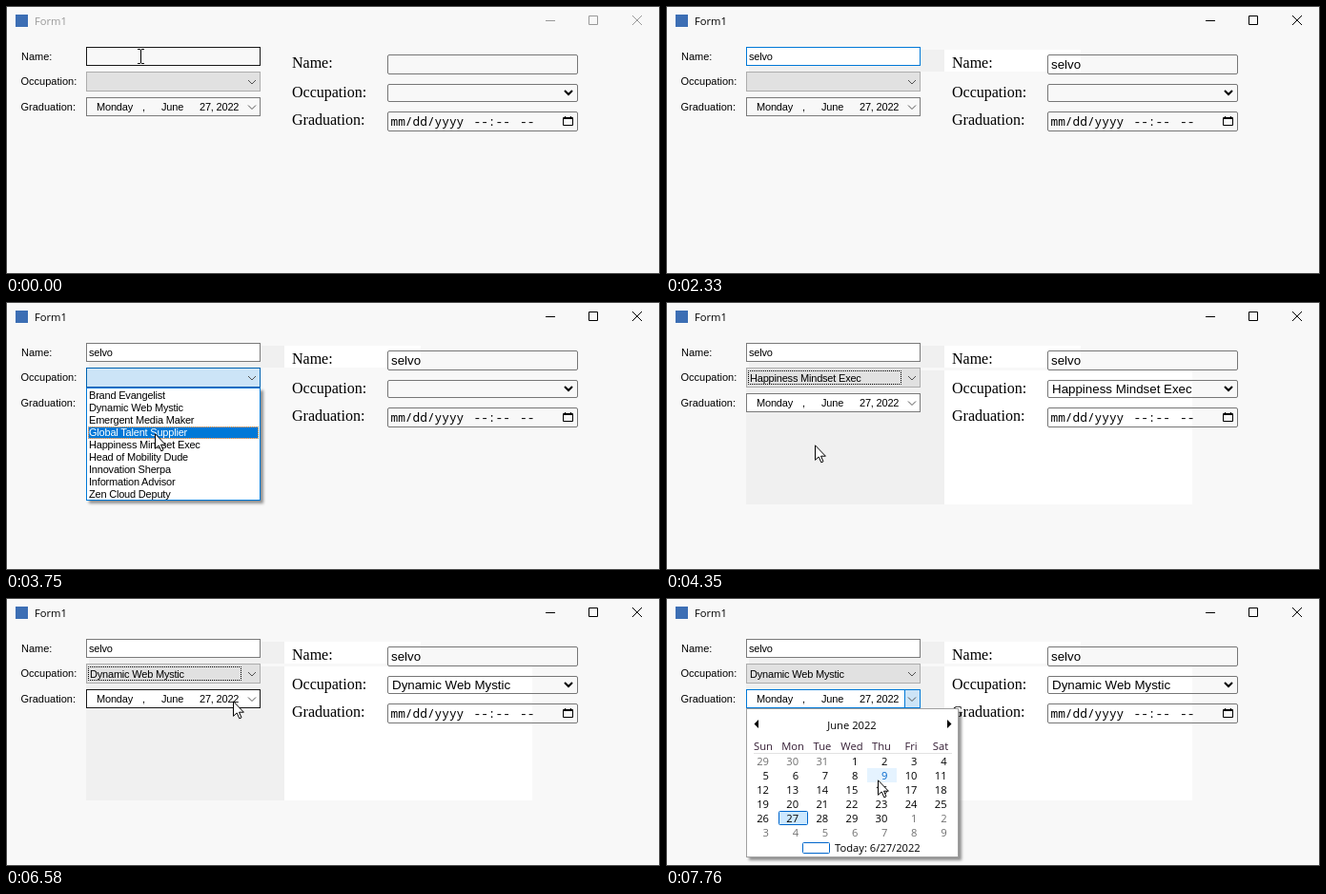
These frames come from a looping animation (686 px wide and 282 px high, 8000 ms). An HTML page:

```html
<!DOCTYPE html>
<html lang="en">
<head>
<meta charset="utf-8">
<title>Form1</title>
<style>
  html, body { margin: 0; width: 100%; height: 100%; overflow: hidden; background: #f8f8f8; }
  svg { display: block; }
  text { fill: #000; }
  .ui { font: 11px "Liberation Sans", Arial, sans-serif; }
  .tight { letter-spacing: -.2px; }
  .sys { font: 11.2px "Open Sans", "Noto Sans", sans-serif; }
  .serif { font: 16px "Liberation Serif", "Times New Roman", serif; }
  .web { font: 13.333px "Liberation Sans", Arial, sans-serif; }
  .mono { font: 12.8px "Noto Sans Mono", "DejaVu Sans Mono", monospace; }
  .line { fill: none; stroke: #000; }
  .input { fill: none; stroke: #767676; }
  .chevron { fill: none; stroke: #505050; }
  .popup { filter: drop-shadow(3px 3px 1.5px rgba(0, 0, 0, .42)); }
  .dots { fill: none; stroke: #000; stroke-dasharray: 1 1; stroke-dashoffset: .5; }
</style>
</head>
<body>
<svg width="686" height="282" viewBox="0 0 686 282">
  <rect x=".5" y=".5" width="685" height="281" fill="#f8f8f8" stroke="#4a4a4a"/>
  <g id="patches"></g>

  <!-- title bar -->
  <rect x="10" y="9" width="13" height="13" fill="#3c6eb4"/>
  <text id="title" class="sys" x="30" y="20">Form1</text>
  <path id="buttons" class="line" d="M566 15.5h10M611.5 10.5h9v9h-9zM657 10l10 10m0-10l-10 10"/>

  <!-- desktop form -->
  <g class="ui">
    <text x="16" y="57">Name:</text>
    <text x="15.5" y="83">Occupation:</text>
    <text x="15.5" y="110">Graduation:</text>
  </g>
  <g class="ui tight">
    <rect id="box" x="84.5" y="43.5" width="182" height="19"/>
    <text id="name" x="87" y="57"></text>
    <rect id="caret" y="46" width="1" height="13"/>

    <rect id="combo" x="84.5" y="69.5" width="182" height="20"/>
    <rect id="focus" class="dots" x="86.5" y="72.5" width="160" height="14"/>
    <text id="job" x="88" y="84"></text>
    <path class="chevron" d="M254 78l4 4 4-4"/>

    <rect id="date" x="84.5" y="96.5" width="182" height="19"/>
    <rect id="drop" x="250.5" y="96.5" width="16" height="19"/>
    <text x="95" y="110">Monday</text>
    <text x="143" y="110">,</text>
    <text x="163" y="110">June</text>
    <text x="203" y="110">27, 2022</text>
    <path class="chevron" d="M254 104.5l4 4 4-4"/>
  </g>

  <!-- web form -->
  <g class="serif">
    <text x="300" y="65">Name:</text>
    <text x="300" y="96">Occupation:</text>
    <text x="300" y="125">Graduation:</text>
  </g>
  <g class="input">
    <rect x="400.5" y="51.5" width="199" height="20" rx="1.5"/>
    <rect x="400.5" y="82.5" width="199" height="18" rx="1.5"/>
    <rect x="400.5" y="111.5" width="199" height="20" rx="1.5"/>
  </g>
  <text id="webName" class="web" x="404" y="66"></text>
  <text id="webJob" class="web" x="405" y="96"></text>
  <path class="line" stroke-width="2" d="M586 89l4 4 4-4"/>
  <g class="mono">
    <text x="403.5" y="126">mm/dd/yyyy</text>
    <text x="490.5" y="126">--:--</text>
    <text x="539" y="126">--</text>
  </g>
  <path class="line" d="M584.5 117.5h10v8h-10zM584 118.5h11M586.5 116v2M592.5 116v2"/>

  <!-- occupation list -->
  <g id="list" class="popup">
    <svg id="listView" x="84" y="90" width="183" height="119">
      <g id="jobs" class="ui tight">
        <rect id="listFrame" x=".5" y=".5" width="182" height="118" fill="#fff"/>
        <rect id="pick" x="2.5" width="178" height="12" fill="#0078d7" stroke="#ff8728" stroke-dasharray="1 1" stroke-dashoffset=".5"/>
      </g>
    </svg>
  </g>

  <!-- calendar -->
  <g id="calendar">
    <rect class="popup" x="84.5" y="116.5" width="222" height="156" fill="#fff" stroke="#a0a0a0"/>
    <path d="M97 128v9l-4.5-4.5zM295 128v9l4.5-4.5z"/>
    <path stroke="#e2e2e2" d="M92 163.5h208"/>
    <rect x="118.5" y="224.5" width="30" height="14" rx="1" fill="#cce8ff" stroke="#0066cc"/>
    <rect id="cell" x="211" y="179" width="31" height="15" fill="#e5f3ff"/>
    <rect x="143.5" y="257.5" width="28" height="11" rx="1" fill="#fff" stroke="#0066cc"/>
    <g id="days" class="sys">
      <text id="month" x="195" y="138" text-anchor="middle">June 2022</text>
      <text x="177" y="267">Today: 6/27/2022</text>
    </g>
  </g>

  <!-- pointers -->
  <path id="beam" class="line" d="M138 45.5h3m1 0h3M141.5 46v14M138 60.5h3m1 0h3"/>
  <path id="arrow" fill="#fff" stroke="#000" d="M.5 .8V16.3L4.2 12.9 6.8 18.8 9 17.8 6.5 12.2H11.4Z"/>
</svg>
<script>
const LOOP = 8000;
const NAME = 'selvo';
const JOBS = ['Brand Evangelist', 'Dynamic Web Mystic', 'Emergent Media Maker',
  'Global Talent Supplier', 'Happiness Mindset Exec', 'Head of Mobility Dude',
  'Innovation Sherpa', 'Information Advisor', 'Zen Cloud Deputy'];
const ROW = 13, LIST_TOP = 92, LIST_HEIGHT = 119, SPLIT = 292;
const BLUE = '#0078d7', GREY = '#7a7a7a', DARK = '#171717';

const $ = id => document.getElementById(id);
const between = (t, a, b) => t >= a && t < b;
const show = (id, on) => { $(id).style.display = on ? '' : 'none'; };
const paint = (id, [fill, stroke]) => {
  $(id).style.fill = fill;
  $(id).style.stroke = stroke;
};

function add(parent, tag, attrs, text = '') {
  const el = document.createElementNS('http://www.w3.org/2000/svg', tag);
  for (const key in attrs) el.setAttribute(key, attrs[key]);
  el.textContent = text;
  return $(parent).appendChild(el);
}

// Value of the last step that has begun; steps are [time, value].
function at(steps, t) {
  let value = steps[0][1];
  for (const [start, v] of steps) if (t >= start) value = v;
  return value;
}

// Repainted areas: time, left, top, right, bottom
const patches = [];
for (const [t, x, y, r, b] of [
  [1290, 87, 46, 411, 69], [1560, 92, 46, 423, 69], [1830, 101, 46, 435, 69],
  [4230, 84, 72, 552, 213]
]) {
  const rect = (left, right, fill) =>
    patches.push([t, add('patches', 'rect', { x: left, y, width: right - left, height: b - y, fill })]);
  rect(x, SPLIT, '#f0f0f0');
  rect(SPLIT, r, '#fff');
}

const jobRows = JOBS.map((job, i) => add('jobs', 'text', { x: 3, y: 12 + ROW * i }, job));

'Sun Mon Tue Wed Thu Fri Sat'.split(' ').forEach((day, c) =>
  add('days', 'text', { x: 102 + 31 * c, y: 160, 'text-anchor': 'middle', style: 'fill:#331c33' }, day));
let ninth;
for (let i = 0; i < 42; i++) {
  const date = new Date(2022, 4, 29 + i);
  const inMonth = date.getMonth() === 5;
  const el = add('days', 'text', {
    x: 108 + 31.1 * (i % 7), y: 176 + 15 * Math.floor(i / 7), 'text-anchor': 'end',
    style: inMonth ? '' : 'fill:#707070'
  }, date.getDate());
  if (inMonth && date.getDate() === 9) ninth = el;
}

const typed = [[0, 0], [1290, 1], [1440, 2], [1560, 3], [1700, 4], [1830, 5]];
const chosen = [[0, ''], [4230, JOBS[4]], [4730, JOBS[3]], [5110, JOBS[2]], [5370, JOBS[1]]];
const unrolled = [[0, 0], [3120, 20], [3240, 45], [3360, LIST_HEIGHT]];
const boxLook = [[0, ['#f8f8f8', DARK]], [650, ['#fff', '#0c4877']],
  [770, ['#fff', BLUE]], [3510, ['#fff', GREY]]];
const comboLook = [[0, ['#e1e1e1', '#adadad']], [2480, ['#e2e6ea', '#7b9bb8']],
  [2600, ['#e4edf5', '#3b88c6']], [2720, ['#e5f1fb', BLUE]],
  [3360, ['#cce4f7', '#0063b1']], [4350, ['#e1e1e1', '#adadad']]];
const dateLook = [[0, ['#f8f8f8', GREY]], [4230, ['#fff', GREY]],
  [6430, ['#fff', DARK]], [7100, ['#fff', BLUE]]];
const dropLook = [[0, ['none', 'none']], [6820, ['#e5f1fb', BLUE]], [7100, ['#cce4f7', BLUE]]];
const pointer = [[2480, [146, 72]], [2600, [151, 78]], [2720, [154, 81]], [2860, [154, 83]],
  [3510, [154, 100]], [3630, [155, 120]], [3750, [156, 138]], [3870, [156, 147]],
  [3990, [156, 150]], [6430, [220, 110]], [6580, [238, 108]], [6700, [252, 106]],
  [6820, [257, 105]], [7380, [246, 134]], [7500, [231, 162]], [7620, [222, 188]],
  [7760, [222, 191]]];

function render(t) {
  const active = t >= 500;
  $('title').style.fill = active ? '#000' : '#999';
  $('buttons').style.stroke = active ? '#000' : '#999';
  for (const [start, el] of patches) el.style.display = t >= start ? '' : 'none';

  paint('box', at(boxLook, t));
  paint('combo', at(comboLook, t));
  paint('date', at(dateLook, t));
  paint('drop', at(dropLook, t));

  $('name').textContent = $('webName').textContent = NAME.slice(0, at(typed, t));
  $('job').textContent = $('webJob').textContent = at(chosen, t);
  $('caret').setAttribute('x', Math.floor(87 + $('name').getComputedTextLength()));
  show('caret', between(t, 770, 2330));
  show('focus', between(t, 4350, 7100));

  const [x, y] = at(pointer, t);
  $('arrow').setAttribute('transform', `translate(${x} ${y})`);
  show('arrow', t >= 2480);
  show('beam', t < 1140);

  // The list slides down from under the combo box.
  const height = at(unrolled, t);
  const open = height === LIST_HEIGHT;
  const hover = open ? Math.floor((y - LIST_TOP) / ROW) : -1;
  show('list', between(t, 3120, 4230));
  $('listView').setAttribute('height', height);
  $('listFrame').style.stroke = open ? BLUE : '#646464';
  $('jobs').setAttribute('transform', `translate(0 ${height - LIST_HEIGHT})`);
  show('pick', hover >= 0);
  $('pick').setAttribute('y', 2.5 + ROW * hover);
  jobRows.forEach((row, i) => { row.style.fill = i === hover ? '#fff' : '#000'; });

  show('calendar', t >= 7100);
  show('cell', t >= 7620);
  ninth.style.fill = t >= 7620 ? '#0066cc' : '#000';
  $('month').style.fill = between(t, 7380, 7500) ? '#0066cc' : '#000';
}

function tick() {
  render(performance.now() % LOOP);
  requestAnimationFrame(tick);
}
tick();
</script>
</body>
</html>
```
